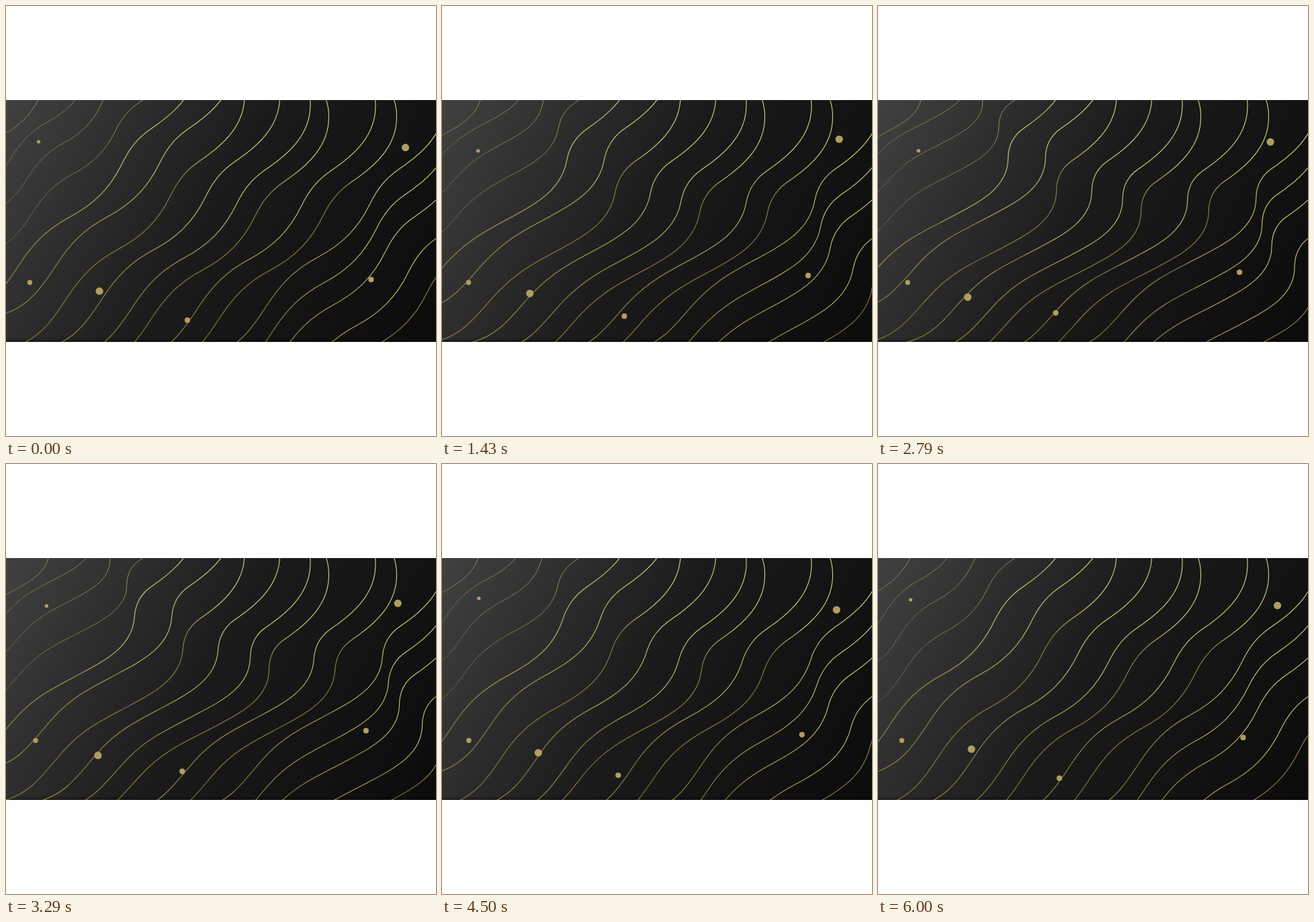
These frames come from a looping animation (640x640 px, 6.07 s). An HTML page:

```html
<!DOCTYPE html>
<html lang="en">
<head>
<meta charset="utf-8">
<title>Golden waves</title>
<style>
  html, body { margin: 0; width: 100%; height: 100%; overflow: hidden; background: #fff; }
  svg { display: block; width: 100vw; height: 100vh; }
  path { fill: none; vector-effect: non-scaling-stroke; }
  circle { fill: #ae9f60; }
</style>
</head>
<body>
<svg viewBox="0 0 640 640">
  <defs>
    <linearGradient id="night" gradientUnits="userSpaceOnUse" x1="0" y1="140" x2="640" y2="500">
      <stop offset="0" stop-color="#414141"/>
      <stop offset=".47" stop-color="#1b1b1b"/>
      <stop offset="1" stop-color="#0b0b0b"/>
    </linearGradient>
    <linearGradient id="floor" x2="0" y2="1">
      <stop offset="0" stop-color="#000" stop-opacity="0"/>
      <stop offset="1" stop-color="#000" stop-opacity=".4"/>
    </linearGradient>
    <linearGradient id="gold" gradientUnits="userSpaceOnUse" x1="0" y1="0" x2="-330" y2="375">
      <stop offset=".1" stop-color="#d9d27a"/>
      <stop offset=".4" stop-color="#cbc26c"/>
      <stop offset=".75" stop-color="#9c8746"/>
    </linearGradient>
    <linearGradient id="bronze" gradientUnits="userSpaceOnUse" x1="0" y1="0" x2="-330" y2="375">
      <stop offset=".16" stop-color="#d9d27a"/>
      <stop offset=".3" stop-color="#988049"/>
      <stop offset="1" stop-color="#93783f"/>
    </linearGradient>
    <linearGradient id="olive" gradientUnits="userSpaceOnUse" x1="0" y1="0" x2="-330" y2="375">
      <stop offset=".2" stop-color="#a3a064"/>
      <stop offset=".9" stop-color="#6f6b40"/>
    </linearGradient>
    <clipPath id="band"><rect y="140" width="640" height="360"/></clipPath>
  </defs>
  <g clip-path="url(#band)">
    <rect y="140" width="640" height="360" fill="url(#night)"/>
    <rect y="494" width="640" height="6" fill="url(#floor)"/>
    <g id="waves"></g>
    <g id="dots"></g>
  </g>
</svg>
<script>
const FPS = 14, STEPS = 84, LOOP = 6070;

// Key points of one wave, measured from its upper bulge: x, y, heading in degrees.
const HEAD = [[-16, -50, 58], [0, 0, 90], [-66, 96, 146]];
const REST = [[-110, 148, 116], [-188, 228, 152], [-264, 300, 123], [-343, 373, 163]];
const BENT = [[-89, 141, 90], [-172, 227, 152], [-270, 288, 136], [-360, 363, 163]];
const HANDLE = .37;

// x and y of the bulge, how late the wave swings back, paint, scale
const WAVES = [
  [127, 32, .06, 'olive', .7],
  [195, 12, .03, 'olive', .7],
  [218, 44, .05, 'olive', .7],
  [251, 67, .12, 'olive', .8],
  [283, 86, 0, 'gold'],
  [338.5, 86, 0, 'gold'],
  [355, 134, 0, 'bronze'],
  [407.5, 135, 0, 'gold'],
  [453, 147, .08, 'gold'],
  [480.5, 165, .2, 'bronze'],
  [550, 149, 0, 'gold'],
  [581.5, 165, 0, 'bronze'],
  [652, 146, 0, 'gold'],
  [661, 184, 0, 'gold'],
  [675, 217, .08, 'gold'],
  [709, 248, .08, 'gold'],
  [737, 278, .08, 'bronze']
];

// Each dot swings on both axes: radius, then centre, reach and peak time for x and y.
const DOTS = [
  [2.7, [54.5, 6, .51], [208, 10, .35]],
  [3.7, [39.9, 4.4, .5], [411.5, 0, 0]],
  [5.6, [137, 6.7, .8], [429, 4.7, .53]],
  [4.1, [266.7, 5.5, .15], [462.3, 5.5, .97]],
  [4.1, [540.2, 5.5, .15], [401.8, 5.5, .97]],
  [5.6, [589, 5.8, .05], [207.5, 10, .8]]
];

const ease = u => (1 - Math.cos(Math.PI * Math.min(1, Math.max(0, u)))) / 2;
const bend = (t, peak, fall, end) => ease(t / peak) * (1 - ease((t - fall) / (end - fall)));
const swing = ([mid, reach, peak], t) => mid + reach * Math.cos(2 * Math.PI * (t - peak));

function ahead([x, y, angle], d) {
  const a = angle * Math.PI / 180;
  return [x + d * Math.cos(a), y + d * Math.sin(a)];
}

function smoothPath(nodes) {
  const last = nodes[nodes.length - 1];
  let d = `M${nodes[0][0]} ${nodes[0][1]}`;
  for (let i = 1; i < nodes.length; i++) {
    const a = nodes[i - 1], b = nodes[i];
    const reach = HANDLE * Math.hypot(b[0] - a[0], b[1] - a[1]);
    d += 'C' + [...ahead(a, reach), ...ahead(b, -reach), b[0], b[1]].join(' ');
  }
  return d + 'L' + ahead(last, 75).join(' ');
}

function wave(t, late) {
  const upper = bend(t, .42, .42 + late, .95 + late / 4);
  const lower = bend(t, .3, .4 + late, .8 + late / 2);
  const tail = REST.map((node, i) =>
    node.map((v, k) => v + (BENT[i][k] - v) * (i < 2 ? upper : lower)));
  return smoothPath([...HEAD, ...tail]);
}

function add(parent, tag, attrs) {
  const el = document.createElementNS('http://www.w3.org/2000/svg', tag);
  for (const k in attrs) el.setAttribute(k, attrs[k]);
  return document.getElementById(parent).appendChild(el);
}

const paths = WAVES.map(([x, y, , paint, scale = 1]) => add('waves', 'path', {
  transform: `translate(${x} ${y}) scale(${scale})`,
  stroke: `url(#${paint})`,
  'stroke-width': paint === 'olive' ? .9 : 1.1
}));
const circles = DOTS.map(([r]) => add('dots', 'circle', { r }));

function draw(t) {
  WAVES.forEach(([, , late], i) => paths[i].setAttribute('d', wave(t, late)));
  DOTS.forEach(([, x, y], i) => {
    circles[i].setAttribute('cx', swing(x, t));
    circles[i].setAttribute('cy', swing(y, t));
  });
}

const start = performance.now();
function tick() {
  const ms = (performance.now() - start) % LOOP;
  draw(Math.floor(ms * FPS / 1000 + .1) % STEPS / STEPS);
  requestAnimationFrame(tick);
}
tick();
</script>
</body>
</html>
```
